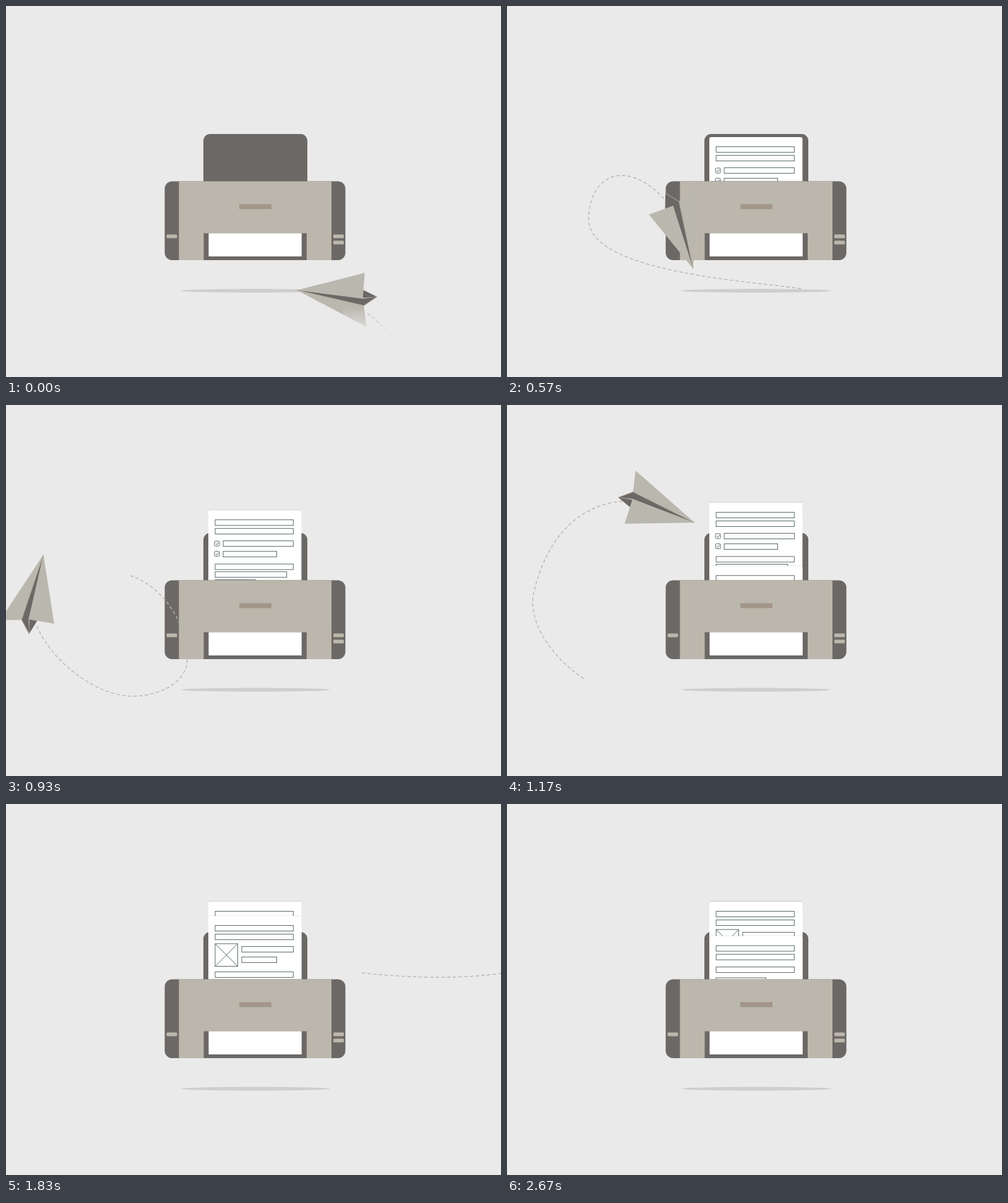
These frames come from a looping animation (800x600 px, 2.7 s). An HTML page:

```html
<!DOCTYPE html>
<html lang="en">
<head>
<meta charset="utf-8">
<title>Printer and paper plane</title>
<style>
  html, body { margin: 0; width: 100%; height: 100%; overflow: hidden; background: #eaeaea; }
  svg { display: block; width: 100vw; height: 100vh; }
  .dark { fill: #6c6865; }
  .light { fill: #bcb7ac; }
  .wing { fill: #bab7ae; }
  .line { fill: none; stroke: #566867; stroke-width: 1; }
</style>
</head>
<body>
<svg viewBox="0 0 800 600" xmlns="http://www.w3.org/2000/svg">
  <defs>
    <linearGradient id="fade" x1="0" y1="0" x2="0" y2="1">
      <stop offset="0" stop-color="#eaeaea" stop-opacity="0"/>
      <stop offset="1" stop-color="#eaeaea"/>
    </linearGradient>
    <clipPath id="body"><rect x="256.5" y="283.5" width="292" height="127.5" rx="12"/></clipPath>
    <path id="route" d="M622 532C590 497 555 468 475 457C390 445 132 430 132 345
      C132 305 153 274 185 274C230 274 293 335 293 411C293 450 245 471 205 471
      C128 471 28 375 43 305C60 226 110 155 200 155C285 160 400 262 535 269
      C610 277 700 287 800 274S930 254 1000 235"/>
  </defs>
  <rect width="800" height="600" fill="#eaeaea"/>
  <ellipse cx="403" cy="460.5" rx="121" ry="3" fill="#cfcecc"/>
  <rect class="dark" x="319" y="207" width="168" height="100" rx="11"/>
  <g id="sheets"></g>
  <g clip-path="url(#body)">
    <rect class="dark" x="256" y="283" width="293" height="129"/>
    <rect class="light" x="279.5" y="283" width="246.5" height="129"/>
    <rect class="dark" x="319.5" y="367.5" width="166.5" height="44"/>
    <rect x="327.5" y="367.5" width="150.3" height="37.5" fill="#fff"/>
  </g>
  <rect x="377" y="320.5" width="52" height="8" fill="#a29689"/>
  <g class="light">
    <rect x="259.5" y="369.5" width="17" height="6" rx="1.5"/>
    <rect x="529" y="369.5" width="17" height="6" rx="1.5"/>
    <rect x="529" y="379.5" width="17" height="6" rx="1.5"/>
  </g>
  <path id="trail" fill="none" stroke="#b5b4af" stroke-width="1.4" stroke-dasharray="5.5 3.7"/>
  <g id="plane">
    <path class="dark" d="M-65 0L-42 9V-4Z"/>
    <path class="wing" d="M65 0L-42 37V-5Z"/>
    <path class="wing" d="M65 0L-52 -50L-45 -16Z"/>
    <path class="dark" d="M65 0L-45 -16L-65 0L-42 -5Z"/>
    <path d="M65 0L-45 -16L-65 0" fill="none" stroke="#b0a799"/>
  </g>
  <rect x="545" y="486" width="110" height="50" fill="url(#fade)"/>
</svg>
<script>
const LOOP = 2700, FRAME = 30, GONE = 1860;
const el = id => document.getElementById(id);
const route = el('route'), trail = el('trail'), plane = el('plane');
const total = route.getTotalLength();
const at = s => route.getPointAtLength(s);

// Sheet contents, measured from the top of the sheet.
const box = (y, w, x = 338, h = 9) => `<rect class="line" x="${x}" y="${y}" width="${w}" height="${h}"/>`;
const check = y => `<rect class="line" x="337" y="${y}" width="8" height="8" rx="1.5"/>
  <path class="line" d="M339 ${y + 4}l1.8 2l2.7 -4"/>`;
const FULL = 126.3;
const pages = [
  check(50) + box(49.5, 113.3, 351) + check(66.5) + box(66.5, 86.5, 351) +
    box(87, FULL) + box(99.5, 115.7) + box(112.5, 65),
  box(45, 36.5, 338, 36.5) + '<path class="line" d="M338 45l36.5 36.5m0 -36.5l-36.5 36.5"/>' +
    box(49.5, 83.3, 381) + box(66.5, 56.5, 381) + box(90.5, FULL) + box(107.5, 80.5),
  box(50, FULL) + box(67.5, 80.5)
];
el('sheets').innerHTML = pages.map(rows => `<g>
  <rect x="327" y="-1.2" width="150.5" height="20" rx="3" opacity=".07"/>
  <path d="M327 125V3a3 3 0 0 1 3 -3H474.5a3 3 0 0 1 3 3V125Z" fill="#fff"/>
  ${box(15.5, FULL) + box(29.5, FULL) + rows}</g>`).join('');
const sheets = [...el('sheets').children];
const feed = [{ start: 0, rate: .187 }, { start: 996, rate: .1875 }, { start: 2167, rate: .206 }];
const sheetTop = ({ start, rate }, t) =>
  Math.max(158, 284 - rate * Math.max(0, t - start) ** .938);

function nearest(x, y) {
  let best = 0, gap = Infinity;
  for (let s = 0; s <= total; s++) {
    const p = at(s), d = Math.hypot(p.x - x, p.y - y);
    if (d < gap) [best, gap] = [s, d];
  }
  return best;
}

// Smooth travel along the route through [time, x, y] keys.
function travel(keys) {
  const k = keys.map(([t, x, y]) => [t, nearest(x, y)]);
  const rate = k.slice(1).map((p, i) => (p[1] - k[i][1]) / (p[0] - k[i][0]));
  const speed = k.map((_, i) => {
    const a = rate[Math.max(0, i - 1)], b = rate[Math.min(i, rate.length - 1)];
    return Math.min((a + b) / 2, 3 * a, 3 * b);
  });
  return t => {
    let i = 0;
    while (i < rate.length - 1 && t > k[i + 1][0]) i++;
    const span = k[i + 1][0] - k[i][0], u = Math.min(1, (t - k[i][0]) / span), v = 1 - u;
    return k[i][1] * v * v * (1 + 2 * u) + k[i + 1][1] * u * u * (3 - 2 * u) +
      span * u * v * (speed[i] * v - speed[i + 1] * u);
  };
}
const front = travel([[0, 535, 470], [570, 282, 363], [930, 43, 305], [1440, 535, 269], [GONE, 1000, 235]]);
const back = travel([[0, 622, 532], [570, 475, 457], [930, 200, 277], [1440, 200, 155],
  [1830, 575, 273], [2220, 800, 274]]);

function draw(t) {
  sheets.forEach((g, i) => g.setAttribute('transform', `translate(0 ${sheetTop(feed[i], t)})`));

  const s = front(t), p = at(s), a = at(s - 12), b = at(s + 12);
  const tilt = -15 * Math.max(0, 1 - t / 120);
  const angle = Math.atan2(b.y - a.y, b.x - a.x) * 180 / Math.PI + tilt;
  plane.setAttribute('transform', `translate(${p.x} ${p.y}) rotate(${angle}) translate(0 6)`);
  plane.style.display = t < GONE ? '' : 'none';

  const to = t < GONE ? s - 53 : total, dots = [];
  for (let d = back(t); d < to; d += 4) dots.push(at(d));
  dots.push(at(to));
  trail.setAttribute('d', t < 2220
    ? 'M' + dots.map(q => q.x.toFixed(2) + ' ' + q.y.toFixed(2)).join('L')
    : '');
}

const start = performance.now();
function tick() {
  const t = (performance.now() - start) % LOOP;
  draw(Math.floor(t / FRAME) * FRAME);
  requestAnimationFrame(tick);
}
tick();
</script>
</body>
</html>
```
